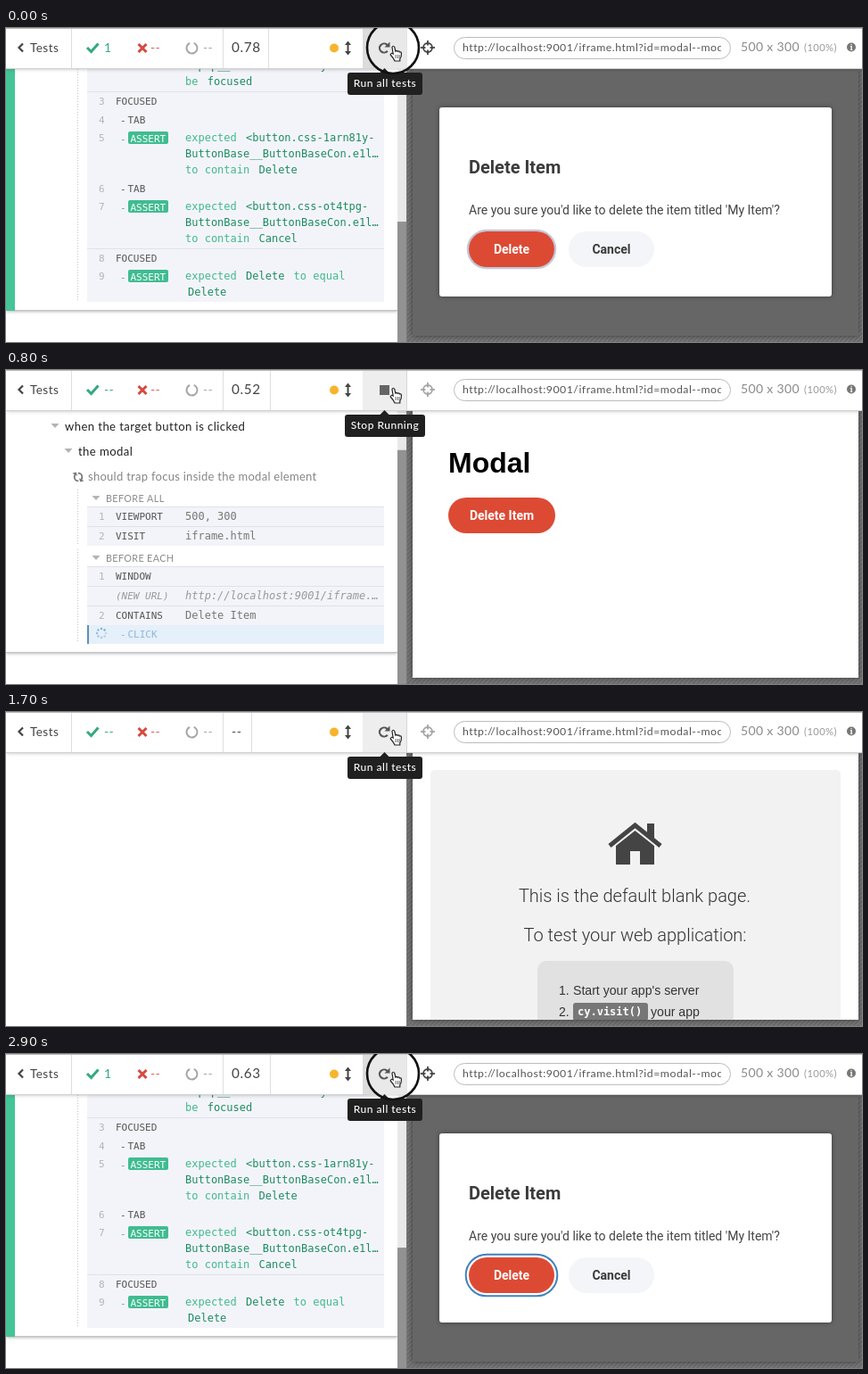
Recreate the animation shown at these times as an HTML page with a canvas. Size 960x352 px, loop 3 s.

```html
<!DOCTYPE html>
<html lang="en">
<head>
<meta charset="utf-8">
<title>Test runner</title>
<style>
html, body { margin: 0; width: 960px; height: 352px; overflow: hidden; background: #fff; }
canvas { display: block; }
</style>
</head>
<body>
<canvas id="stage" width="960" height="352"></canvas>
<script>
const g = document.getElementById('stage').getContext('2d');
const LOOP = 3000, STEP = 100, TOP = 46;

const lato = (size, weight = 400) => `${weight} ${size}px Lato, sans-serif`;
const roboto = (size, weight = 400) => `${weight} ${size}px Roboto, sans-serif`;
const mono = (size, style = '') => `${style} ${size}px "DejaVu Sans Mono", monospace`;
const arial = (size, weight = 400) => `${weight} ${size}px "Liberation Sans", sans-serif`;

const SHORT_URL = 'http://localhost:9001/iframe.html';
const LONG_URL = SHORT_URL + '?id=modal--modal';

// In command messages "|" switches between plain and emphasised text.
const sections = [
  ['BEFORE ALL', [['VIEWPORT', '500, 300'], ['VISIT', 'iframe.html']]],
  ['BEFORE EACH', [['WINDOW', ''], ['(NEW URL)', 'http://localhost:9001/iframe.…'],
    ['CONTAINS', 'Delete Item'], ['-CLICK', '']]],
  ['TEST', [
    ['GET', '[role=dialog]'],
    ['-ASSERT', 'expected |<div.css-1vlwgyq-\nPopup__Container.ele5ym80>| to\nbe |focused'],
    ['FOCUSED', ''],
    ['-TAB', ''],
    ['-ASSERT', 'expected |<button.css-1arn81y-\nButtonBase__ButtonBaseCon.e1l…\n|to contain |Delete'],
    ['-TAB', ''],
    ['-ASSERT', 'expected |<button.css-ot4tpg-\nButtonBase__ButtonBaseCon.e1l…\n|to contain |Cancel'],
    ['FOCUSED', ''],
    ['-ASSERT', 'expected |Delete| to equal\n|Delete']
  ]]
];

const errorLines = [
  ['Error: [cypress-plugin-tab]:', 0], ['Subject is not a tabbable element', 30],
  ["- Use cy.get('body').tab() if you wish to tab", 30], ['into the first element on the page', 0],
  ['- Use cy.focused().tab() if you wish to tab into', 30], ['the currently active element', 0]
];

// Each scene lasts until the next one; the first value is its step in the loop.
const run = { state: 'run' };
const passed = { state: 'pass', steps: 15, page: 'dialog', shade: '#666', time: '0.63', focus: 'strong' };
const failed = { state: 'fail', steps: 10, page: 'dialog', shade: '#7a7a7a', time: '0.75' };
const blank = { state: 'idle', page: 'blank', time: '--' };
const scenes = [
  [0, { ...passed, time: '0.78', focus: 'soft', ring: true }],
  [1, blank],
  [3, { ...run, steps: 0, page: 'blank', time: '--' }],
  [4, { ...run, steps: 2, page: 'loading', time: '0.10' }],
  [5, { ...run, steps: 2, page: 'loading', time: '0.21' }],
  [6, { ...run, steps: 2, page: 'empty', time: '0.32' }],
  [7, { ...run, steps: 4, page: 'story', time: '0.42' }],
  [8, { ...run, steps: 6, page: 'story', time: '0.52' }],
  [9, { ...run, steps: 8, page: 'dialog', shade: '#999', time: '0.63' }],
  [10, failed],
  [14, { ...failed, ring: true }],
  [16, blank],
  [18, { ...run, steps: 0, page: 'blank', time: '--' }],
  [19, { ...run, steps: 2, page: 'loading', time: '0.10' }],
  [20, { ...run, steps: 2, page: 'loading', time: '0.21' }],
  [21, { ...run, steps: 2, page: 'empty', time: '0.32', status: true }],
  [22, { ...run, steps: 4, page: 'story', time: '0.42' }],
  [23, { ...run, steps: 6, page: 'story', time: '0.52' }],
  [24, { ...run, steps: 11, page: 'dialog', shade: '#7a7a7a', time: '0.60' }],
  [25, passed],
  [29, { ...passed, ring: true }]
];

function text(str, x, y, color, font, spacing = 0, align = 'left') {
  g.font = font;
  g.letterSpacing = spacing + 'px';
  g.textAlign = align;
  g.fillStyle = color;
  g.fillText(str, x, y);
}

function rect(x, y, w, h, color) {
  g.fillStyle = color;
  g.fillRect(x, y, w, h);
}

function box(x, y, w, h, r, fill, stroke, width = 1) {
  g.beginPath();
  g.roundRect(x, y, w, h, r);
  if (fill) { g.fillStyle = fill; g.fill(); }
  if (stroke) { g.strokeStyle = stroke; g.lineWidth = width; g.stroke(); }
}

function arc(x, y, r, from, to, color, width) {
  g.beginPath();
  g.arc(x, y, r, from, to);
  g.strokeStyle = color;
  g.lineWidth = width;
  g.stroke();
}

function dot(x, y, r, color) {
  g.beginPath();
  g.arc(x, y, r, 0, 7);
  g.fillStyle = color;
  g.fill();
}

function line(points, color, width, fill) {
  g.beginPath();
  points.forEach(([x, y]) => g.lineTo(x, y));
  if (fill) { g.closePath(); g.fillStyle = fill; g.fill(); }
  if (color) { g.strokeStyle = color; g.lineWidth = width; g.stroke(); }
}

function shadowed(blur, alpha, draw) {
  g.save();
  g.shadowBlur = blur;
  g.shadowColor = `rgba(0,0,0,${alpha})`;
  draw();
  g.restore();
}

function clipped(x, y, w, h, r, draw) {
  g.save();
  g.beginPath();
  g.roundRect(x, y, w, h, r);
  g.clip();
  draw();
  g.restore();
}

const caret = (x, y) => line([[x, y], [x + 9, y], [x + 4.5, y + 5]], null, 0, '#b4b4b4');

function spinner(x, y, color, t) {
  const lead = Math.floor(t / STEP);
  for (let i = 0; i < 8; i++) {
    const a = i * Math.PI / 4;
    g.globalAlpha = 0.4 + 0.6 * ((i + 8 - lead % 8) % 8) / 7;
    dot(x + 5 * Math.cos(a), y + 5 * Math.sin(a), 1.2, color);
  }
  g.globalAlpha = 1;
}

function syncIcon(x, y, angle) {
  g.save();
  g.translate(x, y);
  g.rotate(angle);
  for (let i = 0; i < 2; i++) {
    arc(0, 0, 4.3, 0.25, 2.6, '#777', 1.8);
    line([[-6, 0.5], [-1.5, 0.5], [-6, 5]], null, 0, '#777');
    g.rotate(Math.PI);
  }
  g.restore();
}

function message(str, y, color, strongColor, font) {
  let strong = false;
  str.split('\n').forEach((row, i) => {
    let x = 201;
    row.split('|').forEach((part, j) => {
      if (j) { strong = !strong; if (strong || x > 201) x += 3; }
      text(part, x, y + i * 18, strong ? strongColor : color, font);
      x += g.measureText(part).width;
    });
  });
}

function command([name, body], number, y, width, state, t) {
  const child = name[0] === '-', event = name[0] === '(', check = name === '-ASSERT';
  const bottom = y + 18 * (body.split('\n').length - 1) + 7;
  const bg = { run: '#e5f0fa', fail: '#fbdbde' }[state] || '#f3f4f9';
  const ink = { run: '#91b5d9', fail: '#cf5b66' }[state] || '#555';
  rect(91, y - 14, width - 91, bottom - y + 14, bg);
  if (!child) rect(91, y - 15, width - 91, 1, '#e1e2e9');
  if (state) rect(91, y - 14, 2, 21, state === 'run' ? '#5b93b5' : '#e05d69');
  if (state === 'run') spinner(107, y - 5, '#7da9d2', t);
  else if (!event) text(number, 104, y, state ? ink : '#b3b3b6', mono(11));
  if (check) {
    text('-', 128, y + 1, '#3fb68b', mono(11));
    box(137, y - 11, 45, 14, 2, '#40bc90');
    text('ASSERT', 139.5, y + 1, '#fff', mono(11));
  } else if (child) {
    text('-', 128, y, ink, mono(11));
    text(name.slice(1), 136.5, y, ink, mono(11));
  } else {
    text(name, 123, y, event ? '#999' : ink, mono(11, event ? 'italic' : ''));
  }
  const plain = check ? '#40b98c' : event ? '#999' : state ? ink : '#777';
  message(body, y, plain, '#1d8c60', mono(12, event ? 'italic' : ''));
}

function errorBox(y, width) {
  box(75.5, y + 0.5, width - 76, 124, 2, '#fffee0', '#c9c9ae');
  rect(75, y, 5, 125, '#e1606b');
  errorLines.forEach(([str, indent], i) =>
    text(str, 90 + indent, y + 16 + i * 17, '#c15a58', '12.5px "Open Sans", sans-serif', 0.57));
}

// Distance from the previous baseline to that of a command.
function lead(name, first) {
  if (first || name === '-ASSERT') return 20;
  return name[0] === '-' ? 21 : 22;
}

// Walks the log from top to bottom; returns the lower edge of the panel.
function log(s, width, t, paint) {
  let y = 179, left = s.steps;
  for (const [title, rows] of sections) {
    if (left <= 0) break;
    y += 20;
    const head = y;
    let number = 0;
    if (paint) {
      caret(96.5, y - 7);
      text(title, 112, y, '#8b8b8b', lato(10.8), 0.35);
    }
    for (const row of rows) {
      if (left-- <= 0) break;
      y += lead(row[0], row === rows[0]);
      if (row[0][0] !== '(') number++;
      const state = left === 0 && (s.state === 'run' || s.state === 'fail') ? s.state : '';
      if (paint) command(row, number, y, width, state, t);
      y += 18 * (row[1].split('\n').length - 1);
    }
    if (paint) {
      g.setLineDash([1, 2]);
      line([[80.5, head - 14], [80.5, y + 6]], '#c4c4c4', 1);
      g.setLineDash([]);
    }
    y += 5;
  }
  y += 2;
  if (s.state === 'fail') {
    if (paint) errorBox(y + 4, width);
    return y + 135;
  }
  return y + 10;
}

function reporter(s, t) {
  rect(0, 0, 450, 352, '#fff');
  if (s.state === 'idle') return;
  const bottom = log(s, 0, t, false);
  const scroll = Math.max(0, bottom - 317);
  const panel = scroll ? 439 : 449;
  shadowed(4, 0.45, () => rect(0, TOP, panel, bottom - scroll - TOP, '#fff'));
  rect(0, bottom - scroll - 1, panel, 1, '#c6c6c6');
  g.save();
  g.translate(0, -scroll);
  ['Modal', 'given the ModalNoX story is rendered', 'when the target button is clicked', 'the modal']
    .forEach((title, i) => {
      caret(20.5 + 15 * i, 55 + 28 * i);
      text(title, 36 + 15 * i, 63 + 28 * i, '#222', lato(13.1), 0.42);
    });
  syncIcon(81, 171, (t % 1500 - 400) * Math.PI / 1000);
  text('should trap focus inside the modal element', 92, 175, '#858585', lato(13), 0.28);
  log(s, panel - 15, t, true);
  g.restore();
  if (s.state !== 'run') rect(0, TOP, 10, 317 - TOP, s.state === 'pass' ? '#45c597' : '#e4636f');
  if (scroll) {
    const thumb = TOP + 306 * scroll / (306 + scroll);
    rect(439, TOP, 10, 306, '#e9e9e9');
    rect(439, thumb, 10, 352 - thumb, '#929292');
  }
}

function backdrop() {
  rect(449, TOP, 511, 306, '#777');
  clipped(450, TOP, 510, 306, 0, () => {
    for (let x = 145; x < 960; x += 5) line([[x, 352], [x + 306, TOP]], '#686868', 1.4);
  });
}

function dialog(s) {
  rect(456, TOP, 500, 299, s.shade);
  shadowed(5, 0.45, () => box(486, 89, 440, 212, 3, '#fff'));
  text('Delete Item', 519, 163, '#3b3b3b', roboto(20, 700));
  text("Are you sure you'd like to delete the item titled 'My Item'?", 519, 209, '#444', roboto(14));
  if (s.focus === 'strong') box(515.7, 224.7, 102.6, 46.6, 24, null, '#3f83bf', 2);
  if (s.focus === 'soft') box(518, 227, 98, 42, 21, null, '#c3c8d8', 2.5);
  box(519, 228, 96, 40, 20, '#dc4a34');
  text('Delete', 567, 253, '#fff', roboto(14, 700), 0, 'center');
  box(631, 228, 96, 40, 20, '#f4f5f8');
  text('Cancel', 679, 253, '#3b3b3b', roboto(14, 700), 0, 'center');
}

function story() {
  text('Modal', 496, 115, '#000', arial(32, 700));
  box(496, 143, 120, 40, 20, '#dc4a34');
  text('Delete Item', 556, 168, '#fff', roboto(14, 700), 0, 'center');
}

function emptyPreview() {
  text('No Preview', 706, 124, '#111', roboto(20, 700), 0, 'center');
  [['Sorry, but you either have no stories or none are', 506, 160], ['selected somehow.', 506, 179],
    ['Please check the Storybook config.', 546, 214], ['Try reloading the page.', 546, 233],
    ['If the problem persists, check the browser console, or', 506, 268],
    ["the terminal you've run Storybook from.", 506, 287]]
    .forEach(([str, x, y]) => text(str, x, y, '#111', roboto(16)));
  dot(531, 209, 2.7, '#111');
  dot(531, 228, 2.7, '#111');
}

function blankPage() {
  box(476, 65, 460, 300, 5, '#f2f2f2');
  line([[677, 150], [705.5, 127], [734, 150]], '#444', 5);
  rect(719, 125, 8, 16, '#444');
  line([[684, 150], [705.5, 133], [727, 150], [727, 171], [711, 171], [711, 156], [700, 156],
    [700, 171], [684, 171]], null, 0, '#444');
  text('This is the default blank page.', 705, 213, '#333', roboto(20, 300), 0, 'center');
  text('To test your web application:', 705.5, 257, '#333', roboto(20, 300), 0, 'center');
  box(596, 279, 220, 90, 10, '#e1e1e1');
  text('1.', 620, 317, '#333', arial(14));
  text("Start your app's server", 636, 317, '#333', arial(14.1));
  text('2.', 620, 341, '#333', arial(14));
  box(636, 326, 84, 20, 3, '#777');
  text('cy.visit()', 641, 340, '#fff', mono(12, 'bold'));
  text('your app', 723, 341, '#333', arial(14.1));
}

function preview(s) {
  backdrop();
  const pages = { dialog, story, empty: emptyPreview, blank: blankPage, loading() {} };
  shadowed(6, 0.5, () => rect(456, TOP, 500, 299, s.page === 'dialog' ? s.shade : '#fff'));
  clipped(456, TOP, 500, 299, 0, () => pages[s.page](s));
}

function addressBar(s, t) {
  const loading = s.page === 'loading';
  const short = loading || s.page === 'empty';
  const width = loading ? 315 : 310;
  box(502.5, 10.5, width, 24, 12, '#fff');
  clipped(503, 10, loading ? 230 : 299, 25, 0, () =>
    text(short ? SHORT_URL : LONG_URL, 512, 26, '#555', lato(12.3), 0.5));
  if (loading) {
    clipped(502.5, 10.5, width, 24, 12, () => {
      rect(735, 10, 84, 26, '#ededed');
      rect(734, 10, 1, 26, '#c6c6c6');
    });
    text('...loading', 740, 26, '#555', lato(11.5), 0.25);
    spinner(803, 21, '#333', t);
  }
  box(502.5, 10.5, width, 24, 12, null, '#bcbcbc');
  text('500 x 300', 824, 26, '#8a8a8a', lato(14), 0.35);
  text('(100%)', 895, 26, '#999', lato(11.2), 0.4);
  dot(948, 21.5, 5, '#777');
  text('i', 948, 25, '#fff', 'bold 9px "Noto Serif", serif', 0, 'center');
}

function header(s, t) {
  const done = s.state === 'pass' || s.state === 'fail';
  shadowed(5, 0.4, () => rect(0, 0, 960, 45, '#fff'));
  rect(0, 0, 960, 1, '#b9b9b9');
  rect(0, 45, 960, 1, '#d3d3d3');
  line([[19, 17.5], [14.5, 22], [19, 26.5]], '#444', 2.2);
  text('Tests', 27, 27, '#444', lato(13.6), 0.4);

  line([[91, 22], [95.5, 26.5], [103.5, 17.5]], '#34a980', 3);
  text(s.state === 'pass' ? '1' : '--', 110, 27, '#34a980', lato(14), 0.4);
  line([[148.5, 18], [157.5, 27]], '#d9493f', 3);
  line([[157.5, 18], [148.5, 27]], '#d9493f', 3);
  text(s.state === 'fail' ? '1' : '--', 162, 27, '#d0605a', lato(14), 0.4);
  arc(208.5, 22.5, 6, -1.2, 4.3, '#a5a5a5', 2);
  text('--', 221, 27, '#a5a5a5', lato(14), 0.4);
  const idle = s.time === '--';
  text(s.time, 253, 27, '#444', lato(idle ? 14 : 15.3), 0.6);
  const edge = idle ? 275 : /7/.test(s.time) ? 294 : 296;
  [73, 243, edge].forEach(x => rect(x, 1, 1, 44, '#dedede'));

  dot(368, 22.5, 5, '#f7b42c');
  line([[383.5, 17], [383.5, 28]], '#444', 2);
  line([[380, 19], [383.5, 14.5], [387, 19]], null, 0, '#444');
  line([[380, 26], [383.5, 30.5], [387, 26]], null, 0, '#444');

  rect(400, 1, 49, 44, s.ring ? '#dcdcdc' : '#eeeeee');
  rect(449, 1, 1, 44, '#d6d6d6');
  if (s.ring) dot(434, 22, 29, 'rgba(255,255,255,.35)');
  if (s.state === 'run') {
    rect(419, 17, 11, 11, '#666');
  } else {
    arc(424, 22.5, 5, 0.7, 5.6, '#555', 2.2);
    line([[430.5, 15.5], [430.5, 21.5], [424.5, 21.5]], null, 0, '#555');
  }

  const aim = done ? '#444' : '#a5a5a5';
  arc(473, 22, 5, 0, 7, aim, 1.8);
  [[0, -1], [0, 1], [1, 0], [-1, 0]].forEach(([x, y]) =>
    line([[473 + 2.5 * x, 22 + 2.5 * y], [473 + 8 * x, 22 + 8 * y]], aim, 1.8));
  addressBar(s, t);
}

function tooltip(s) {
  const running = s.state === 'run';
  const half = running ? 45 : 42;
  line([[419.5, 50], [424.5, 45], [429.5, 50]], null, 0, '#202020');
  box(425 - half, 50, half * 2, 25, 3, '#202020');
  text(running ? 'Stop Running' : 'Run all tests', 425, 66, '#fff', lato(12, 500), 0.5, 'center');
}

function pointer() {
  g.beginPath();
  g.moveTo(434.2, 29);
  g.lineTo(433, 21.5);
  g.quadraticCurveTo(434.2, 19, 435.8, 21.5);
  g.lineTo(436.8, 26);
  g.quadraticCurveTo(438.3, 24.5, 439, 26.3);
  g.quadraticCurveTo(440.7, 25, 441.3, 27);
  g.quadraticCurveTo(443.4, 26.2, 443.4, 28.5);
  g.quadraticCurveTo(443.8, 32, 441.8, 34.5);
  g.lineTo(441.8, 37);
  g.lineTo(436, 37);
  g.quadraticCurveTo(434.5, 33.5, 431.2, 30);
  g.quadraticCurveTo(431.8, 27.5, 434.2, 29);
  g.closePath();
  g.fillStyle = '#fff';
  g.fill();
  g.strokeStyle = '#222';
  g.lineWidth = 1.2;
  g.stroke();
  [437, 439.2, 441.2].forEach(x => line([[x, 30], [x, 34]], '#444', 0.8));
}

function statusBar() {
  box(-12, 326, 342, 40, 14, 'rgba(0,0,0,.06)');
  box(-4.5, 335.5, 323, 30, 4, '#fafafa', '#a9a9a9');
  text('Waiting for localhost...', 5, 350, '#666', arial(12));
}

function draw(now) {
  const t = now % LOOP;
  const step = Math.floor(t / STEP);
  const s = scenes.filter(([start]) => start <= step).pop()[1];
  const tick = step * STEP;
  reporter(s, tick);
  preview(s);
  header(s, tick);
  tooltip(s);
  if (s.ring) arc(434, 22, 29, 0, 7, '#111', 2.6);
  pointer();
  if (s.status) statusBar();
}

const start = performance.now();
function frame() {
  draw(performance.now() - start);
  requestAnimationFrame(frame);
}
frame();
</script>
</body>
</html>
```
